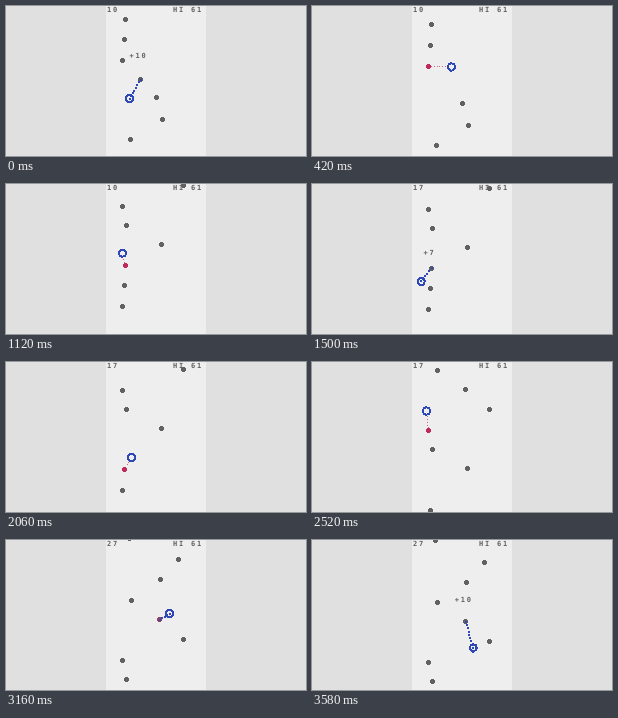
An HTML page with a canvas that plays this animation: 300 by 150 pixels, repeating every 3.6 s.

```html
<!DOCTYPE html>
<html lang="en">
<head>
<meta charset="utf-8">
<title>Pin swing</title>
<style>
html, body { margin: 0; width: 100%; height: 100%; overflow: hidden; background: #e0e0e0; }
canvas { display: block; width: 300px; height: 150px; }
</style>
</head>
<body>
<canvas id="stage" width="300" height="150"></canvas>
<script>
const ctx = document.getElementById('stage').getContext('2d');
const LOOP = 3600, STEP = 20;
const GRAY = '#616161', BLUE = '#2f48b8', RED = '#c02a5a', MIXED = '#8f4560';
const GRAVITY = 267, STIFF = 26, OMEGA = Math.sqrt(STIFF), SAG = GRAVITY / STIFF;
const WALL = 102, LEFT = 100, WIDTH = 100;

// World coordinates equal stage coordinates at time 0.
const pins = [
  [124, 133], [156, 113], [150, 91], [134, 73], [116, 54], [118, 33],
  [119, 12.5], [155, -8.5], [120, -27.5], [116, -46.5], [177, -67.5],
  [153.3, -87.3], [125.3, -106.5], [154, -127], [172, -147], [122.5, -168.3]
].map(([x, y]) => ({ x, y, gone: Infinity }));

const grabs = [
  { pin: pins[3], from: -540, to: 210, gain: 10, total: 10 },
  { pin: pins[6], from: 1300, to: 2015, gain: 7, total: 17 },
  { pin: pins[11], from: 3160, to: LOOP, gain: 10, total: 27 }
];
grabs.forEach(g => { if (g.to < LOOP) g.pin.gone = g.to; });

// Ballistic flight through (x, y) at time t0, bouncing off the left wall.
const flight = (t0, x, y, vx, vy) => t => {
  const s = (t - t0) / 1000;
  return {
    x: WALL + Math.abs(x + vx * s - WALL),
    y: y + vy * s + GRAVITY / 2 * s * s
  };
};

// Weight on an elastic cord of zero rest length.
const swing = (pin, t0, dx, dy, vx, vy) => t => {
  const a = OMEGA * (t - t0) / 1000, c = Math.cos(a), s = Math.sin(a) / OMEGA;
  return {
    x: pin.x + dx * c + vx * s,
    y: pin.y + SAG + (dy - SAG) * c + vy * s
  };
};

const motions = [
  [210, swing(pins[3], 0, -11, 19.3, 113, 68)],
  [1300, flight(780, 127, 10.5, -33, -75)],
  [2015, swing(pins[6], 1300, -9.2, -4.9, -33, 64)],
  [3160, flight(2060, 125, 20.5, -76, -250)],
  [LOOP, swing(pins[11], 3160, 9.7, -6, 76, 43)]
];
const ringAt = t => motions.find(m => t < m[0])[1](t);

// The view drifts slowly and follows the ring when it climbs.
const scrolls = [];
for (let t = 0, scroll = 0, dt = 2; t < LOOP; t += dt) {
  if (t % STEP === 0) scrolls.push(scroll);
  const lag = Math.max(0, 73 - ringAt(t).y - scroll);
  scroll += (5.4 + 5.5 * lag) * dt / 1000;
}
const scrollAt = t => t < 0 ? t * 0.0054 : scrolls[Math.floor(t / STEP)];

// Rectangle on whole pixels, centred on the pixel at (x, y).
function block(x, y, w, h = w) {
  ctx.fillRect(Math.round(x - w / 2 + 0.5), Math.round(y - h / 2 + 0.5), w, h);
}

function dot(p, color) {
  ctx.fillStyle = color;
  block(p.x, p.y, 3, 5);
  block(p.x, p.y, 5, 3);
}

function cord(a, b, size, gap, color) {
  ctx.fillStyle = color;
  const n = Math.max(1, Math.round(Math.hypot(b.x - a.x, b.y - a.y) / gap));
  for (let i = 0; i <= n; i++) {
    block(a.x + (b.x - a.x) * i / n, a.y + (b.y - a.y) * i / n, size);
  }
}

function ring(p) {
  ctx.fillStyle = BLUE;
  for (let i = 0; i < 16; i++) {
    const a = i * Math.PI / 8;
    block(p.x + Math.cos(a) * 3.6, p.y + Math.sin(a) * 3.6, 2);
  }
}

function label(text, x, y) {
  ctx.fillStyle = GRAY;
  ctx.fillText(text, x, y);
}

function draw(t) {
  const scroll = scrollAt(t);
  const onStage = p => ({ x: p.x, y: p.y + scroll });
  const me = onStage(ringAt(t));
  const held = grabs.find(g => t >= g.from && t < g.to);
  const live = pins.filter(p => t < p.gone);

  ctx.fillStyle = '#e0e0e0';
  ctx.fillRect(0, 0, 300, 150);
  ctx.save();
  ctx.beginPath();
  ctx.rect(LEFT, 0, WIDTH, 150);
  ctx.clip();
  ctx.fillStyle = '#eeeeee';
  ctx.fillRect(LEFT, 0, WIDTH, 150);

  ctx.font = 'bold 7px "DejaVu Sans Mono", monospace';
  ctx.letterSpacing = '1.79px';
  const score = grabs.filter(g => t >= g.from).pop().total;
  label(String(score), 101, 6);
  label('HI 61', 167, 6);

  live.forEach(p => dot(onStage(p), GRAY));

  if (held) {
    const anchor = onStage(held.pin);
    if (t === held.from) dot(anchor, MIXED);
    cord(anchor, me, 2, 3.2, BLUE);
  } else {
    const dist = p => Math.hypot(p.x - me.x, p.y + scroll - me.y);
    const near = live.reduce((a, b) => dist(a) < dist(b) ? a : b);
    if (dist(near) > 9) {
      const target = onStage(near);
      cord(target, me, 1, 3, 'rgba(192,42,90,.7)');
      dot(target, RED);
      ctx.fillStyle = '#eeeeee';
      block(me.x, me.y, 5);
    }
  }
  ring(me);

  grabs.forEach(g => {
    const n = (t - g.from) / STEP;
    if (n < 1 || n > 30) return;
    const text = '+' + g.gain;
    const y = g.pin.y + scrollAt(g.from) - 2 - 20 * (1 - 0.9 ** n);
    label(text, g.pin.x - 1.5 - text.length * 3, Math.round(y + 3));
  });
  ctx.restore();
}

const start = performance.now();
function tick() {
  const t = (performance.now() - start) % LOOP;
  draw(Math.floor(t / STEP) * STEP);
  requestAnimationFrame(tick);
}
tick();
</script>
</body>
</html>
```
